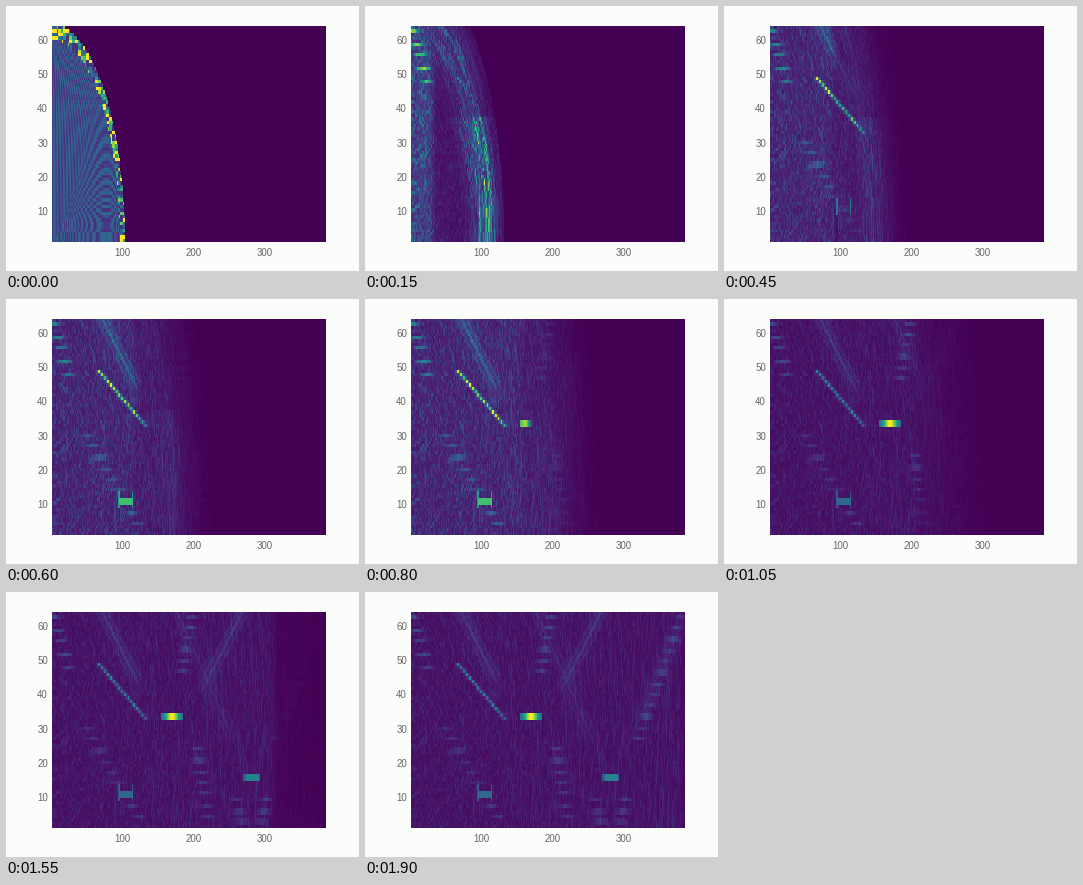
A matplotlib script that plays this animation: 353x265 px, repeating every 1950 ms.

```python
import numpy as np
import matplotlib.pyplot as plt
from matplotlib.animation import FuncAnimation

W, H, DPI = 353, 265, 100
NX, NY, FRAMES = 384, 64, 39
L, T, R, B = 45.7, 20, 319.2, 236
ASPECT = 1.62  # depth cells per row

x = 1 + (NX - 1) * (np.arange(NX) + 0.5) / NX
y = 1 + (NY - 1) * (np.arange(NY) + 0.5) / NY
X, Y = np.meshgrid(x, y)
RAD = np.hypot(X, ASPECT * (Y - 1))
rng = np.random.default_rng(4)


def arcs(first, last, count):
    """Random echoes smeared along arcs around a column of sensors."""
    total = np.zeros_like(X)
    for yc in np.linspace(first, last, count):
        echo = rng.normal(size=900)
        total += echo[np.hypot(X, ASPECT * (Y - yc)).astype(int)]
    return np.abs(total) / np.sqrt(count)


def box(x0, x1, y0, y1):
    return (X >= x0) & (X <= x1) & (Y >= y0) & (Y <= y1)


def bell(d, width):
    return np.exp(-(d / width) ** 2)


def arm(x0, y0, x1, y1, amp):
    """Short horizontal streaks stepping along a sidelobe."""
    out = np.zeros_like(X)
    for k in np.linspace(0, 1, int(abs(y1 - y0) / 3) + 1):
        xc, yc = x0 + k * (x1 - x0), y0 + k * (y1 - y0)
        gain = amp * rng.uniform(0.7, 1.2)
        out = np.maximum(out, gain * bell(X - xc, 8) * (np.abs(Y - yc) < 0.6))
    return out


def wings(xc, yc, slope, gap, amp):
    off = np.abs(X - xc) - gap - slope * (Y - yc)
    ripple = 0.6 + 0.4 * np.cos(2 * np.pi * off / 8)
    return amp * bell(off, 9) * ripple * np.clip((Y - yc - 6) / 8, 0, 1)


noise = np.clip(0.03 + 0.034 * arcs(-6, 70, 11), 0, 0.11)
wake = 0.03 + 0.1 * arcs(-4, 12, 3)
speckle = rng.random((NY, NX // 4)).repeat(4, axis=1)

streaks = np.max([
    arm(4, 62.5, 24, 48, .18),       # near the sensors
    arm(50, 30, 122, 4.5, .1),       # around the plate
    arm(183, 47, 197, 62.5, .14),    # around the spot
    arm(205, 24, 219, 4.5, .11),
    arm(318, 27, 379, 62.5, .14),    # around the slab
    arm(258, 9, 266, 3, .1),
    arm(300, 9, 294, 3, .1),
], axis=0)
bands = wings(169, 33, 2.45, 22, .11) + wings(281, 16, 2.1, 4, .05)

# slanted reflector: one short dash per row, with weaker flanks
off = X - (64 + (49.5 - Y) * 4.1)
core = rng.uniform(.32, .5, (NY, 1)) * (np.abs(off) < 1.2)
line = box(60, 140, 32.8, 49.6) * np.maximum(core, .19 * bell(off, 5))

spot = box(154, 184, 32.2, 34) * (.32 + .68 * bell(X - 169, 9))
plate = box(95, 114, 10, 12.1) * .34
posts = (box(94, 96, 9, 13.5) | box(113, 115, 9, 13.5)) * .27
slab = box(267, 292, 15, 17.1) * np.where(np.abs(X - 281) < 9, .45, .27)
solids = np.max([plate, slab, spot], axis=0)


def first_view():
    """Fan of stripes with a leaf-shaped moire under a bright rim."""
    u = X / np.sqrt(np.clip(1 - ((Y - 1) / 63) ** 2, 1e-4, 1))
    fan = np.cos(2 * np.pi * u / 4.6)
    v = Y / ((X / 80) ** 1.3 * np.clip(1 - (X / 103) ** 6, .02, 1))
    leaf = np.cos(2 * np.pi * 6 * np.log(v))
    mix = 1 / (1 + np.exp((v - 55) / 6))
    img = .24 + .09 * fan * (1 - mix) + .1 * leaf * mix
    img = np.where(RAD > 96, np.clip(1.3 * speckle ** 1.4, .15, 1), img)
    top = box(0, 8, 60, 64)
    img = np.where(top, np.where(np.sin(np.pi * (Y - 60)) > 0, 1, .3), img)
    return img * (RAD < 103)


def view(n):
    if n == 0:
        return first_view()
    reach, focus = 102 + 10 * n, 10 * n + 3
    done = 1 / (1 + np.exp(np.clip((X - focus) / 3, -40, 40)))

    # beyond the focused depth only part of the aperture has answered
    gain = np.clip(1.45 - .037 * n, .15, .85)
    halo = gain * np.clip(1 - (RAD - focus) / 100, .08, 1) * (RAD < reach)
    halo = np.where(RAD < 97, .45, 1) * halo
    cover = np.maximum(done, halo)
    img = noise * cover + np.maximum(streaks, bands) * np.maximum(done, .4 * halo)

    # fresh echoes trail the front and fade as it moves on
    ring = bell(RAD - 85 - 7 * n, 17) * (RAD < reach) * (1 - done)
    img += wake * ring * np.where(Y < 37, .75, .35) * np.exp(-(n - 3) / 7)
    sides = box(96, 98, 1, 20) | box(113, 115, 1, 20)
    img += bell(n - 3, 3) * speckle * .1 * sides

    near = (RAD < reach - 25) * min(1, n / 9)
    img = np.maximum(img, line * np.maximum(done, .75 * near))
    img = np.maximum(img, posts * np.maximum(done, .7 * near))
    img = np.maximum(img, solids * done)
    return img / img.max()


fig = plt.figure(figsize=(W / DPI, H / DPI), dpi=DPI, facecolor="#fbfdfa")
ax = fig.add_axes([L / W, 1 - B / H, (R - L) / W, (B - T) / H])
pic = ax.imshow(view(0), cmap="viridis", vmin=0, vmax=1, origin="lower",
                extent=(1, NX, 1, NY), aspect="auto", interpolation="nearest")
ax.axis("off")

font = dict(family="Liberation Sans", fontsize=7, color="#666666", va="center")
for v in (100, 200, 300):
    px = L + (v - 1) / (NX - 1) * (R - L)
    fig.text(px / W, 1 - 246.5 / H, str(v), ha="center", **font)
for v in range(10, 61, 10):
    py = B - (v - 1) / (NY - 1) * (B - T)
    fig.text(42 / W, 1 - (py + 1) / H, str(v), ha="right", **font)


def draw(n):
    pic.set_data(view(n))
    return [pic]


anim = FuncAnimation(fig, draw, frames=FRAMES, interval=50, repeat=True,
                     repeat_delay=0)
plt.show()
```
